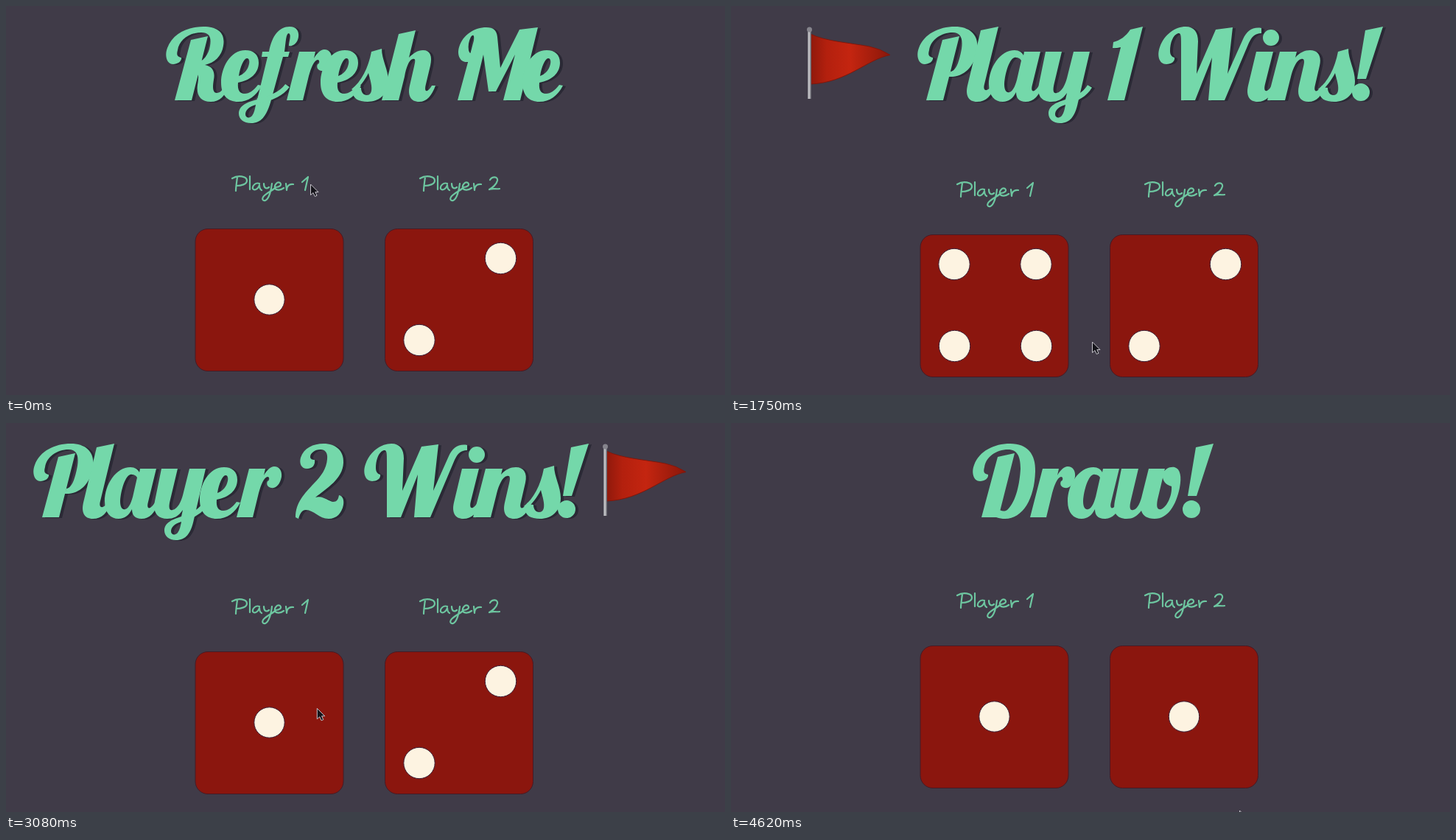
An HTML page that plays this animation: 976x528 px, repeating every 4.69 s.

```html
<!DOCTYPE html>
<html lang="en">
<head>
<meta charset="utf-8">
<title>Dice</title>
<style>
html, body { margin: 0; width: 100%; height: 100%; overflow: hidden; background: #403b48; }
svg { display: block; width: 976px; height: 528px; }
.title path { fill: #74d8aa; }
.title .thin { fill: none; stroke: #74d8aa; stroke-width: 7; }
.shadow { filter: drop-shadow(4px 1px 0 #2a2935); }
.label { fill: none; stroke: #6dc6a0; stroke-width: 2.2; stroke-linecap: round; stroke-linejoin: round; }
.die { fill: #8b160e; stroke: #471a25; stroke-width: 1; }
.pip { fill: #fdf3e1; stroke: #3a2038; stroke-width: 1; }
</style>
</head>
<body>
<svg viewBox="0 0 976 528">
  <defs>
    <linearGradient id="red">
      <stop offset="0" stop-color="#8f190c"/>
      <stop offset=".2" stop-color="#b3200e"/>
      <stop offset=".5" stop-color="#c42510"/>
      <stop offset="1" stop-color="#8a170a"/>
    </linearGradient>
    <linearGradient id="steel">
      <stop offset="0" stop-color="#77777f"/>
      <stop offset=".4" stop-color="#d3d3d6"/>
      <stop offset="1" stop-color="#56555f"/>
    </linearGradient>
    <g id="flag">
      <path fill="url(#red)" stroke="#7f170c" d="M5 38C25 48 60 50 85 55Q100 58 113 66.500C82 72 55 104 5 106Z"/>
      <rect x="1" y="31" width="5" height="95" fill="url(#steel)"/>
      <circle cx="3.500" cy="32" r="3.500" fill="#85848c"/>
    </g>
  </defs>
  <g id="titles"></g>
  <g id="board"></g>
  <path id="cursor" d="M.5 1V15.500L4 12.500L6.300 17.500L9 16.300L6.800 11.500H11Z" fill="#15141a" stroke="#c4c2c9"/>
</svg>
<script>
// Script lettering, baseline at y = 128
const glyphs = {
  P: 'M47 79C38 79 35 67 39 57C46 38 66 28 88 28C110 28 121 41 118 60C114 84 99 97 80 96L82 89C90 88 94 74 97 58C99 44 96 36 85 36C69 36 55 46 53 60C51 67 53 69 58 70C59 75 53 79 47 79ZM71 46L94 41L72 128H49Z',
  l: 'M123 33L147 28L128 106C125 117 133 116 138 108H142C138 122 130 130 118 130C106 130 102 121 105 108Z',
  a: 'M169 60C175 60 179 63 181 67L182 62H204L193 107C190 118 196 118 202 108H207C202 122 195 130 184 130C175 130 171 125 171 117C167 125 161 130 153 130C142 130 134 122 134 106C134 84 149 60 169 60ZM171 70C163 68 156 90 155 106C155 115 158 118 162 117C167 116 171 106 173 96L178 74C176 71 174 70 171 70Z',
  y: 'M211 62H233L223 104C220 116 222 119 226 118C233 117 238 106 240 98L249 62H271L255 131C251 150 244 159 231 159C221 159 215 153 215 146C215 135 226 131 238 127L240 118C234 127 227 130 219 130C205 130 199 121 202 106ZM238 134C228 137 224 142 224 147C224 152 230 153 233 149C236 145 237 139 238 134Z',
  e: 'M296 60C275 60 263 84 263 104C263 121 272 130 286 130C300 130 311 122 318 108L313 107C307 115 301 119 295 119C288 119 285 114 286 104C303 101 314 91 314 77C314 66 307 60 296 60ZM287 95C289 82 294 71 298 71C302 71 302 77 300 82C298 88 293 93 287 95Z',
  r: 'M330 62H352L350 71C354 64 359 59 364 59C371 59 375 65 374 73C372 84 366 89 360 88C355 87 353 83 355 79C358 78 358 73 355 73C350 74 346 84 343 95L335 128H313Z',
  2: 'M409 62C400 62 398 54 400 47C404 34 417 28 431 28C448 28 459 38 458 54C457 76 436 88 420 101C430 98 437 106 444 107C449 107 451 104 452 98C457 99 459 104 458 111C456 122 449 130 438 130C425 130 418 118 407 118C401 118 399 124 397 130L393 128C393 108 405 96 418 82C428 72 435 62 436 49C437 40 433 36 427 36C419 36 413 41 413 46C413 49 416 50 419 50C420 57 416 62 409 62Z',
  W: 'M497 79C487 79 484 67 488 56C494 38 510 28 523 28C535 28 540 36 540 48L538 92L564 32L587 29L580 92L601 45C606 34 614 28 626 30V37C617 37 613 42 609 50L576 128H554L559 70L536 128H517L517 52C517 41 517 36 513 37C506 39 502 50 502 61C502 66 504 69 508 70C509 75 504 79 497 79Z',
  i: 'M619 62H642L631 106C628 118 634 118 640 108H645C640 122 632 130 621 130C609 130 605 121 608 108ZM628 43a11 11 0 1 1 22 0a11 11 0 1 1 -22 0Z',
  n: 'M651 62H674L672 70C678 63 685 60 692 60C703 60 708 68 705 81L699 107C696 118 702 118 708 108H713C708 122 701 130 690 130C678 130 674 121 677 108L683 82C685 74 684 71 680 72C674 73 669 84 666 96L658 128H634Z',
  s: 'M703 113C716 103 726 84 730 62L744 58C744 73 753 86 753 102C753 120 740 130 725 130C712 130 705 125 705 118C705 112 710 109 716 111C716 117 719 121 724 121C729 121 731 116 730 108C729 100 727 96 726 91C721 101 714 110 707 116Z',
  '!': 'M767 33L791 28L768 99H756ZM749 117a12 12 0 1 1 24 0a12 12 0 1 1 -24 0Z',
  1: 'M559 28L534 128H511L529 56C526 57 522 57 518 57L519 49C528 47 536 41 542 32Z',
  R: 'M227 79C218 79 215 67 219 57C226 38 246 28 268 28C288 28 298 37 295 54C293 68 283 77 270 80C281 82 284 90 282 100C280 112 281 118 286 118C291 118 294 114 297 108H302C298 122 290 130 278 130C264 130 258 121 260 107C262 95 262 88 254 86L256 78C268 76 275 66 277 54C279 42 276 36 265 36C249 36 235 46 233 60C231 67 233 69 238 70C239 75 233 79 227 79ZM251 46L274 41L252 128H229Z',
  f: 'M357 62C361 40 371 28 385 28C394 28 398 34 397 42C396 50 390 55 384 54C384 48 388 40 384 37C380 37 380 48 378 62H385L383 69H376L359 131C353 150 346 159 333 159C322 159 316 153 316 146C316 135 328 130 341 127L355 69H347L348 62ZM339 134C329 137 325 142 325 147C325 152 331 153 334 149C337 145 338 139 339 134Z',
  h: 'M533 38L556 33L547 70C553 64 559 60 566 60C576 60 579 68 576 81L570 106C567 118 572 118 578 108H583C578 122 571 130 561 130C549 130 545 121 548 108L554 82C556 74 556 71 552 72C547 73 543 84 541 96L533 128H510Z',
  M: 'M625 76C616 76 612 66 615 56C620 39 636 29 652 29C662 29 666 33 667 42L671 84L697 32L722 29L698 128H675L691 66L665 116H655L648 66L633 128H613L635 47C636 39 634 38 631 42C628 48 627 54 628 60C629 64 632 66 635 66C636 72 632 76 625 76Z',
  D: 'M338 79C329 79 326 67 330 57C337 38 357 28 379 28C402 28 414 42 413 66C412 103 396 130 372 130C364 130 357 128 352 122L362 116C366 120 372 121 376 117C387 106 392 82 393 62C393 46 389 36 376 36C360 36 346 46 344 60C342 67 344 69 349 70C350 75 344 79 338 79ZM362 46L385 41L363 128H340Z',
  w: 'M530 62H553L543 104C540 116 542 119 546 118C552 117 556 107 558 98L567 62H589L579 104C577 115 579 118 584 117C592 114 599 98 598 86C590 84 585 78 586 70C588 62 596 59 602 60C610 62 612 73 609 88C604 112 593 130 575 130C565 130 559 126 557 119C551 127 545 130 537 130C523 130 518 121 521 106Z'
};
// Upstrokes leaving the two descenders
const links = {
  y: 'M240 129C254 126 265 119 271 109',
  f: 'M341 129C358 126 374 119 382 108'
};
const hand = {
  Player: 'M314 232C313 240 312 246 312 251M307 234C315 229 327 231 327 237C327 242 319 244 313 244M331 231V249M344 241C339 239 334 244 335 248C337 251 342 249 344 243C344 247 345 249 347 250M350 241C350 247 353 249 357 246M361 241C360 250 357 262 352 264C348 265 347 261 350 258C354 254 360 251 364 248M366 246C371 246 375 243 372 240C368 238 364 243 365 247C367 251 373 250 377 247M380 241L381 250C381 245 384 241 390 242',
  1: 'M402 239L410 232L406 250',
  2: 'M402 236C405 231 413 231 412 237C411 242 405 247 401 249C406 247 410 249 415 248'
};

// Each title: text, horizontal shift per letter, flag position
const titles = {
  start: { text: 'Refresh Me', shift: [0, 29, 0, 68, 164, -234, 0, 0, 0, 438] },
  one: { text: 'Play 1 Wins!', shift: [216, 216, 216, 216, 0, 0, 0, 94, 94, 94, 94, 94], flag: 103 },
  two: { text: 'Player 2 Wins!', shift: [], flag: 810 },
  draw: { text: 'Draw!', shift: [0, 93, 323, 0, -136], flat: true }
};
// Start time, title, both dice
const rounds = [
  [0, 'start', 1, 2], [210, 'two', 2, 4], [1400, 'one', 4, 2],
  [2240, 'two', 1, 2], [3150, 'one', 6, 4], [4060, 'draw', 1, 1]
];
// Time, x, y of the pointer
const track = [
  [0, 413, 241], [420, 413, 241], [1050, 625, 424], [1750, 490, 455], [2240, 530, 512],
  [2730, 576, 417], [3500, 219, 346], [4060, 316, 420], [4620, 690, 525]
];
const LOOP = 4690, STEP = 70;
const $ = id => document.getElementById(id);

function letters({ text, shift }) {
  return [...text].map((c, i) => {
    if (c === ' ') return '';
    const link = links[c] ? `<path class="thin" d="${links[c]}"/>` : '';
    return `<g transform="translate(${shift[i] || 0})"><path d="${glyphs[c]}"/>${link}</g>`;
  }).join('');
}

function die(cx, n) {
  const spots = [];
  if (n % 2) spots.push([0, 0]);
  if (n > 1) spots.push([56.5, -56], [-54, 55]);
  if (n > 3) spots.push([-54.5, -56], [57, 55]);
  if (n === 6) spots.push([-54.5, 0], [56, 0]);
  const pips = spots.map(([x, y]) =>
    `<circle class="pip" cx="${cx + x}" cy="${398.5 + y}" r="${x ? 21.2 : 20.7}"/>`);
  return `<rect class="die" x="${cx - 100.5}" y="302.5" width="201" height="193" rx="17"/>` + pips.join('');
}

const label = (n, dx) =>
  `<path class="label" role="img" aria-label="Player ${n}" transform="translate(${dx})" d="${hand.Player}${hand[n]}"/>`;

$('titles').innerHTML = Object.entries(titles).map(([id, t]) =>
  `<g id="${id}" class="title" role="img" aria-label="${t.text}">
    <g class="${t.flat ? '' : 'shadow'}">${letters(t)}</g></g>`).join('');
for (const [id, t] of Object.entries(titles)) {
  if (t.flag) $('titles').insertAdjacentHTML('beforeend', `<use id="${id}-flag" href="#flag" x="${t.flag}"/>`);
}

let shown;
function show(round) {
  if (round === shown) return;
  shown = round;
  const [, name, a, b] = round;
  for (const el of $('titles').children) {
    el.style.display = el.id.split('-')[0] === name ? '' : 'none';
  }
  $('board').setAttribute('transform', `translate(0 ${titles[name].flag ? 8 : 0})`);
  $('board').innerHTML = label(1, 0) + label(2, 255) + die(357.5, a) + die(615, b);
}

function point(t) {
  const i = Math.max(1, track.findIndex(k => k[0] >= t));
  const [t0, x0, y0] = track[i - 1], [t1, x1, y1] = track[i];
  const u = (t - t0) / (t1 - t0), e = u * u * (3 - 2 * u);
  $('cursor').setAttribute('transform', `translate(${x0 + (x1 - x0) * e} ${y0 + (y1 - y0) * e})`);
}

function draw() {
  const t = Math.floor(performance.now() % LOOP / STEP) * STEP;
  show(rounds.filter(r => r[0] <= t).pop());
  point(t);
  requestAnimationFrame(draw);
}
draw();
</script>
</body>
</html>
```
